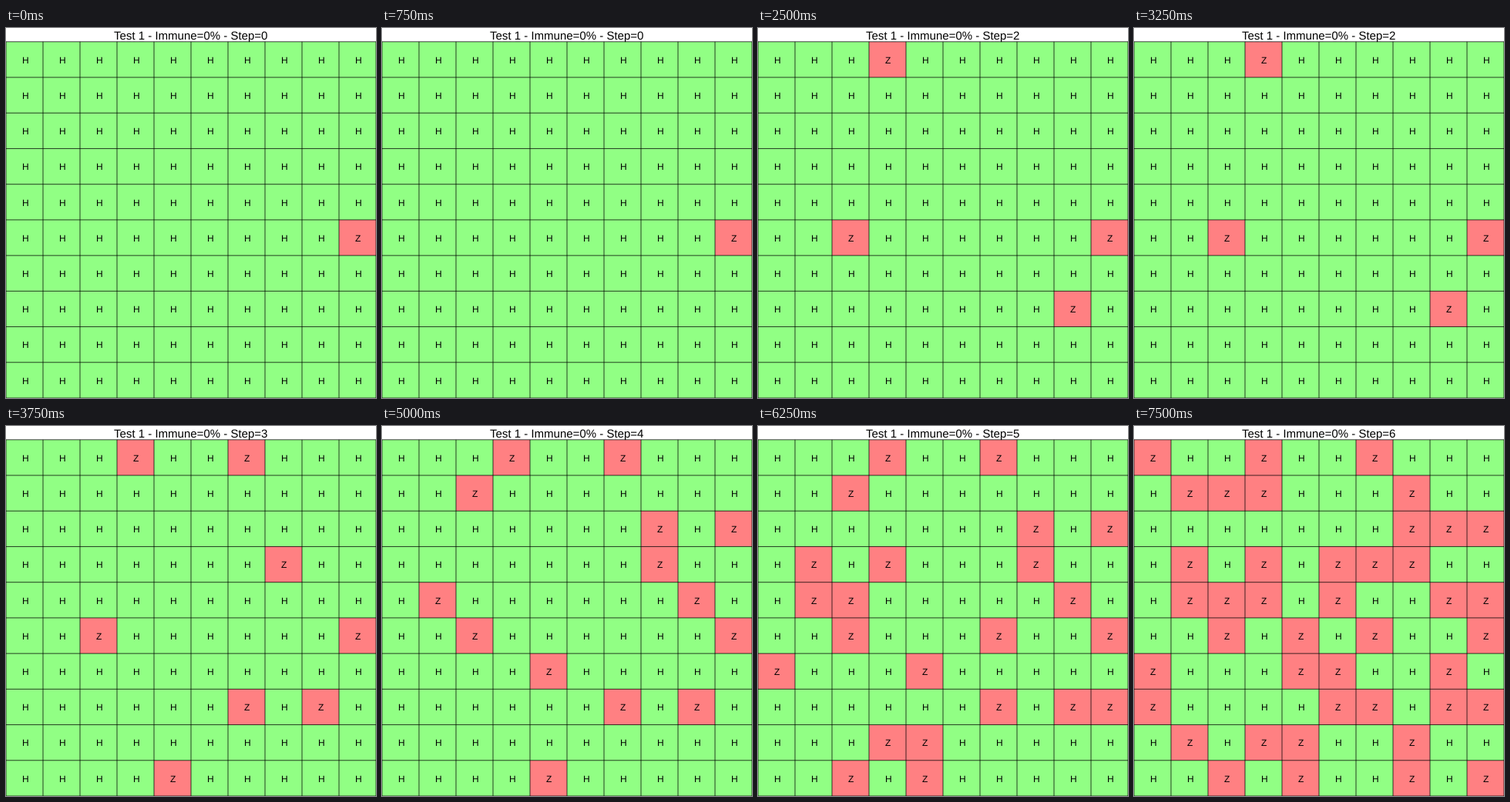
A matplotlib script for the animation above (8000 ms loop, 480x480 px).

```python
import matplotlib.pyplot as plt
import numpy as np
from matplotlib.animation import FuncAnimation
from matplotlib.colors import ListedColormap

SIZE, DPI, N = 480, 100, 10
TOP = 17.8
FRAME_MS, STEP_MS, LOOP_MS = 250, 1250, 8000
PX = 72 / DPI  # points per pixel
HEALTHY, ZOMBIE = "#91ff84", "#ff8082"

# Cells (row, column digits) that turn at each step
INFECTED = [
    "59",
    "52",
    "03 78",
    "06 37 76 94",
    "12 27 29 41 48 64",
    "31 33 42 56 60 79 83 84 92",
    "00 11 13 17 28 35 36 43 45 49 54 65 68 70 75 81 87 97 99",
]

plt.rcParams["font.family"] = "Liberation Sans"
plt.rcParams["text.hinting"] = "none"
fig = plt.figure(figsize=(SIZE / DPI, SIZE / DPI), dpi=DPI, facecolor="white")
ax = fig.add_axes([0, 0, 1, 1])
ax.set_xlim(0, SIZE)
ax.set_ylim(SIZE, 0)
ax.axis("off")

# When each cell turns; cells never listed stay healthy
turn_step = np.full((N, N), len(INFECTED))
for step, cells in enumerate(INFECTED):
    for cell in cells.split():
        turn_step[int(cell[0]), int(cell[1])] = step

xs = np.linspace(0, SIZE, N + 1)
ys = np.linspace(TOP, SIZE, N + 1)
mesh = ax.pcolormesh(xs, np.round(ys), np.zeros((N, N)), vmin=0, vmax=1,
                     cmap=ListedColormap([HEALTHY, ZOMBIE]))

# Unsnapped lines stay centred on the cell edges
line = dict(colors="black", alpha=0.75, lw=PX, snap=False, zorder=2)
ax.vlines(xs, TOP, SIZE, **line)
ax.hlines(ys, 0, SIZE, **line)


def label(x, y, px):
    return ax.text(x, y, "", fontsize=px * PX, ha="center", va="baseline",
                   color="black", zorder=3)


title = label(SIZE / 2, 15, 15)
letters = [[label((x0 + x1) / 2, (y0 + y1) / 2 + 4.75, 12)
            for x0, x1 in zip(xs, xs[1:])]
           for y0, y1 in zip(ys, ys[1:])]


def draw(frame):
    step = frame * FRAME_MS // STEP_MS
    sick = turn_step <= step
    mesh.set_array(sick.astype(float))
    title.set_text(f"Test 1 - Immune=0% - Step={step}")
    for (r, c), ill in np.ndenumerate(sick):
        letters[r][c].set_text("Z" if ill else "H")
    return []


anim = FuncAnimation(fig, draw, frames=LOOP_MS // FRAME_MS,
                     interval=FRAME_MS, repeat=True, repeat_delay=0)
plt.show()
```
